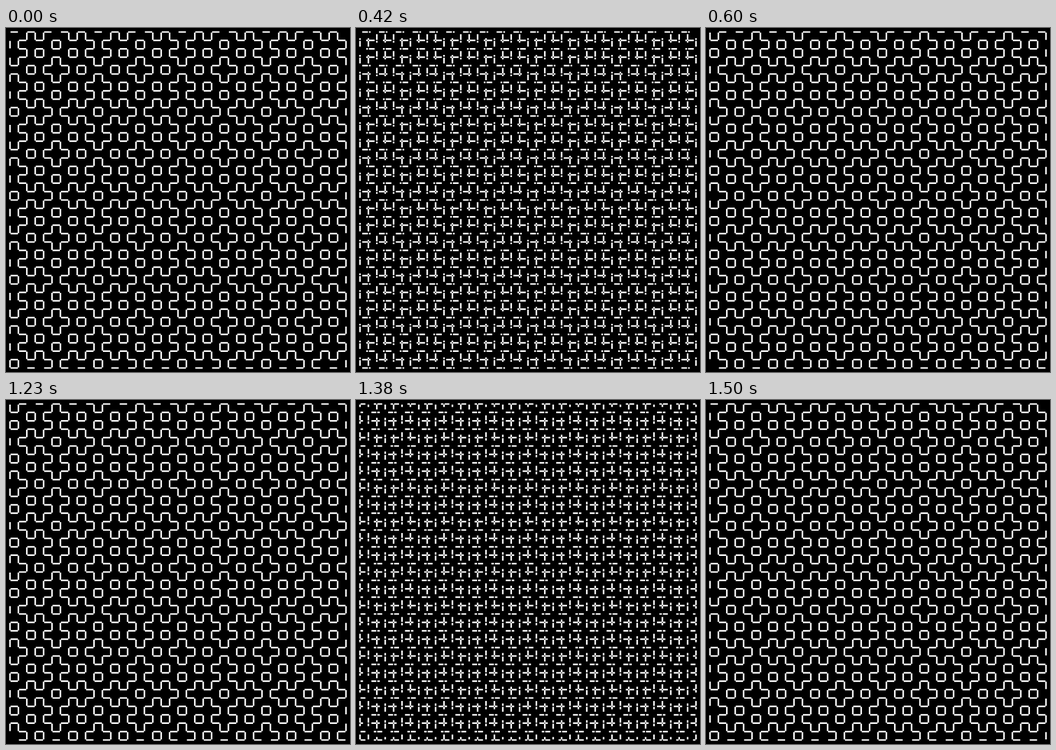
An HTML page that plays this animation: 600 by 600 pixels, repeating every 1.8 s.

```html
<!DOCTYPE html>
<html lang="en">
<head>
<meta charset="utf-8">
<title>Sliding stitches</title>
<style>
  html, body { margin: 0; width: 100%; height: 100%; overflow: hidden; background: #000; }
  svg { display: block; width: 100%; height: 100%; }
</style>
</head>
<body>
<svg viewBox="0 0 600 600">
  <path id="cloth" fill="none" stroke="#fff" stroke-width="2.7"/>
</svg>
<script>
const LOOP = 1800, MOVE = 300, STARTS = [300, 1215];
const CELLS = 40, EDGE = 7, STEP = 586 / CELLS, INSET = 0.9 / STEP;
const ROWS = [0, 1, 1, 1, 0], COLS = [1, 1, 0, 0, 0];
const cloth = document.getElementById('cloth');

const clamp = x => Math.min(1, Math.max(0, x));
const ease = x => x < 0.5 ? 4 * x ** 3 : 1 - 4 * (1 - x) ** 3;
const at = u => (EDGE + u * STEP).toFixed(2);

// Visible parts of one line of stitches, cut at the grid points.
function stitches(bit, shift) {
  const start = bit ? 1 - shift : shift;
  const parts = [];
  for (let a = start - 4; a < CELLS; a += 2) {
    const first = Math.floor(a);
    for (let n = first; n <= first + 1; n++) {
      if (n < 0 || n >= CELLS) continue;
      const from = Math.max(a, n + INSET);
      const to = Math.min(a + 1, n + 1 - INSET);
      if (to - from > 0.005) parts.push([at(from), at(to)]);
    }
  }
  return parts;
}

function draw(ms) {
  const t = ms % LOOP;
  const shift = STARTS.reduce((sum, s) => sum + ease(clamp((t - s) / MOVE)), 0);
  const runs = [stitches(0, shift), stitches(1, shift)];
  let d = '';
  for (let k = 0; k <= CELLS; k++) {
    const c = at(k);
    for (const [a, b] of runs[ROWS[k % 5]]) d += `M${a} ${c}H${b}`;
    for (const [a, b] of runs[COLS[k % 5]]) d += `M${c} ${a}V${b}`;
  }
  cloth.setAttribute('d', d);
}

const begin = performance.now();
function tick() {
  draw(performance.now() - begin);
  requestAnimationFrame(tick);
}
tick();
</script>
</body>
</html>
```
